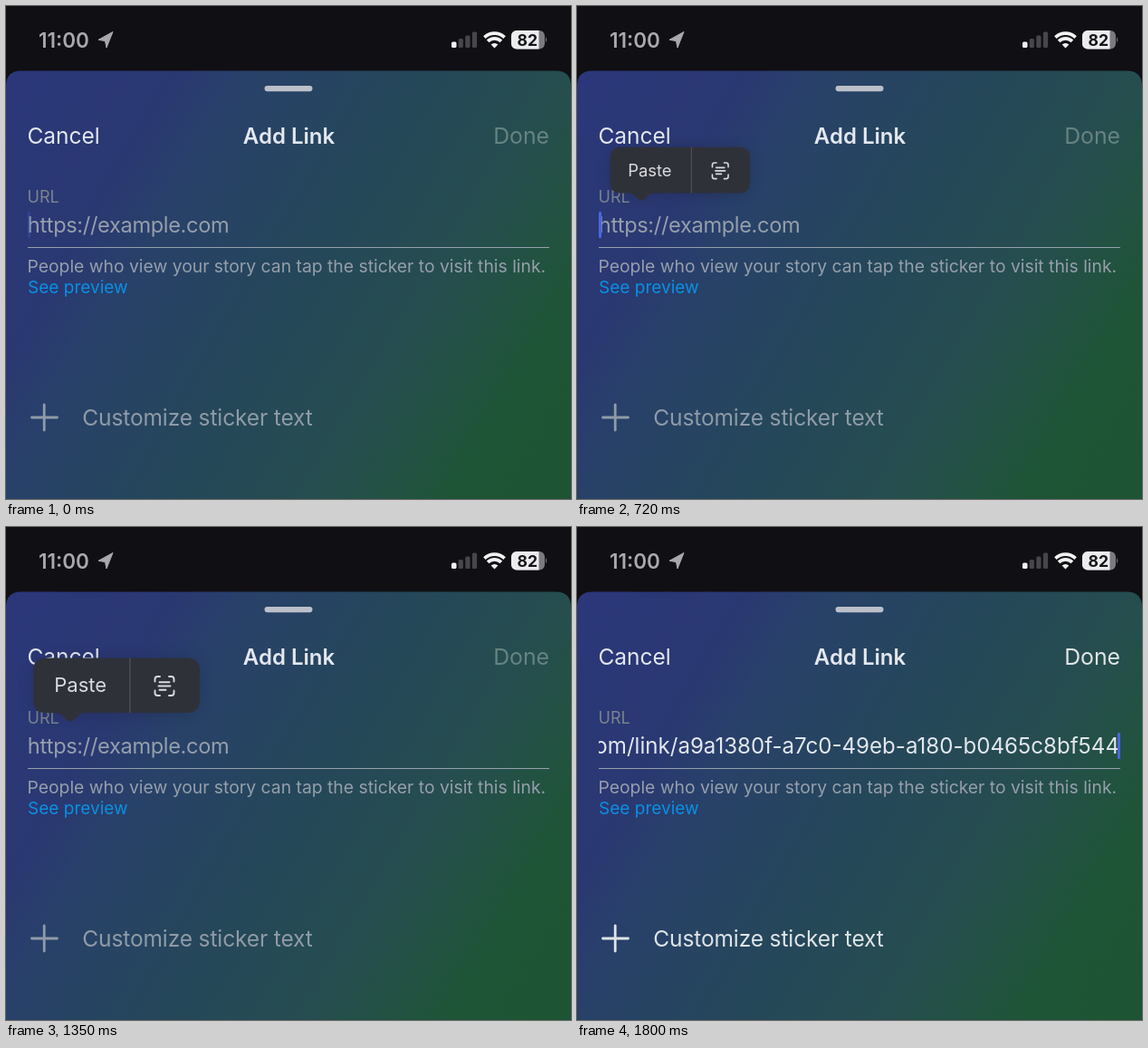
An HTML page that plays this animation: 624x544 px, repeating every 1830 ms.

```html
<!DOCTYPE html>
<html lang="en">
<head>
<meta charset="utf-8">
<title>Add Link</title>
<style>
  html, body { margin: 0; width: 100%; height: 100%; overflow: hidden; background: #100f13; }
  svg { display: block; width: 624px; height: 544px; }
  text {
    font-family: Inter, "Liberation Sans", sans-serif;
    font-optical-sizing: none;
    white-space: pre;
  }
  .bright { fill: #e3e7ef; }
  .soft { fill: #969fab; }
  .faint { fill: #7a848f; }
  .status { fill: #a9a8ad; }
  .line { fill: none; stroke-linecap: round; stroke-linejoin: round; }
  .bold { font-weight: 600; }
</style>
</head>
<body>
<svg viewBox="0 0 624 544">
  <defs>
    <linearGradient id="tint" gradientUnits="userSpaceOnUse" x1="31" y1="18" x2="699" y2="407">
      <stop offset="0" stop-color="#2b377a"/>
      <stop offset=".21" stop-color="#2a3872"/>
      <stop offset=".305" stop-color="#284169"/>
      <stop offset=".5" stop-color="#25475a"/>
      <stop offset=".68" stop-color="#264d50"/>
      <stop offset=".79" stop-color="#225241"/>
      <stop offset=".86" stop-color="#1e5536"/>
      <stop offset="1" stop-color="#1d5433"/>
    </linearGradient>
    <clipPath id="field"><rect x="24" y="222" width="576" height="40"/></clipPath>
    <clipPath id="cell"><rect x="558" y="27" width="37" height="20.5" rx="6"/></clipPath>
    <filter id="blur" x="-30%" y="-60%" width="160%" height="220%"><feGaussianBlur stdDeviation="10"/></filter>
  </defs>

  <rect width="624" height="544" fill="#100f13"/>

  <!-- status bar -->
  <text class="status bold" x="36" y="46" font-size="22.5">11:00</text>
  <path class="status" d="M118 28.5L102 37.3L109.5 38.6L111 46Z" stroke="#a9a8ad" stroke-linejoin="round"/>
  <g fill="#47464b">
    <rect x="492" y="39.5" width="5.5" height="6.5" rx="1.5" fill="#f2f2f4"/>
    <rect x="499.7" y="36" width="5.2" height="10" rx="1.5"/>
    <rect x="507.3" y="32.5" width="5.2" height="13.5" rx="1.5"/>
    <rect x="514.9" y="28.5" width="5.2" height="17.5" rx="1.5"/>
  </g>
  <g fill="none" stroke="#f2f2f4" stroke-width="3.7">
    <path d="M528.4 34.6a16 16 0 0 1 22.2 0"/>
    <path d="M532.1 38.9a10.5 10.5 0 0 1 14.8 0"/>
    <path d="M539.5 46.5l-3.9-4a5.6 5.6 0 0 1 7.8 0z" fill="#f2f2f4" stroke="none"/>
  </g>
  <g clip-path="url(#cell)">
    <rect x="558" y="27" width="37" height="21" fill="#7b7a7f"/>
    <rect x="558" y="27" width="30.5" height="21" fill="#ececef"/>
  </g>
  <path d="M596 34q2.4 3.2 0 6.5z" fill="#7b7a7f"/>
  <text x="575.8" y="43.7" font-size="17.6" font-weight="700" text-anchor="middle" fill="#151418">82</text>

  <!-- sheet -->
  <path d="M0 544V88.5Q0 71.5 17 71.5H607Q624 71.5 624 88.5V544Z" fill="url(#tint)"/>
  <rect x="285.5" y="88" width="53" height="6.2" rx="3.1" fill="#bbbfc9"/>
  <text class="bright" x="23.4" y="152" font-size="24.5">Cancel</text>
  <text class="bright bold" x="312.5" y="152" font-size="24" text-anchor="middle">Add Link</text>
  <text id="done" x="600" y="152" font-size="24.8" text-anchor="end">Done</text>

  <text class="faint" x="23.6" y="216.5" font-size="18">URL</text>
  <text id="hint" class="soft" x="23.8" y="249.5" font-size="23.6" letter-spacing="-.35">https://example.com</text>
  <g clip-path="url(#field)">
    <text id="link" class="bright" x="599" y="249.7" font-size="24.1" text-anchor="end">example.com/link/a9a1380f-a7c0-49eb-a180-b0465c8bf544</text>
  </g>
  <rect id="caret" y="227" width="3" height="29" rx="1.2" fill="#4a66df"/>
  <rect x="24" y="266" width="576" height="1" fill="#95a0ab"/>
  <text class="soft" x="23.5" y="294" font-size="19.32">People who view your story can tap the sticker to visit this link.</text>
  <text x="24" y="316.5" font-size="19.05" fill="#0a90e2">See preview</text>

  <g id="custom">
    <path class="line" d="M28.5 454H56.5M42.2 440V468" stroke="currentColor" stroke-width="2.8"/>
    <text x="84.3" y="462.5" font-size="24.5" letter-spacing="-.12" fill="currentColor">Customize sticker text</text>
  </g>

  <!-- edit menu, hung from the tip of its arrow -->
  <g id="menu">
    <rect x="32" y="148" width="180" height="57" rx="14" opacity=".18" filter="url(#blur)"/>
    <path d="M44 144.5H200Q214 144.5 214 158.5V191Q214 205 200 205H87Q82 205 77 211Q71 218 65 211Q60 205 55 205H44Q30 205 30 191V158.5Q30 144.5 44 144.5Z" fill="#2f3139"/>
    <rect x="136.3" y="144.5" width="1.2" height="60.5" fill="#54565d"/>
    <text x="53.3" y="182.3" font-size="22" fill="#d9dbdf">Paste</text>
    <g class="line" stroke="#d9dbdf" stroke-width="1.9">
      <path d="M164.5 170.5V168Q164.5 165 167.5 165H170M180 165H182.5Q185.5 165 185.5 168V170.5M185.5 180.5V183Q185.5 186 182.5 186H180M170 186H167.5Q164.5 186 164.5 183V180.5"/>
      <path d="M169.5 171.3H180.5M168.5 175.5H181.5M169.5 179.7H176.5"/>
    </g>
  </g>
</svg>

<script>
const LOOP = 1830, STEP = 30;
const OPEN = 515, CLOSE = 1432, PASTE = 1590, STIFFNESS = .016;
const TIP = { x: 71, y: 215 };
// [ms, caret opacity]
const BLINK = [[0, .25], [40, 0], [230, 0], [360, 1], [1120, 1], [1250, 0], [1400, 0], [1530, 1], [LOOP, 1]];

const $ = id => document.getElementById(id);
const clamp = v => Math.min(1, Math.max(0, v));

// critically damped spring from 0 to 1
function spring(ms) {
  const x = Math.max(0, ms) * STIFFNESS;
  return 1 - (1 + x) * Math.exp(-x);
}

function sample(table, t) {
  const i = table.findIndex(([at]) => at > t);
  const [t0, v0] = table[i - 1], [t1, v1] = table[i];
  return v0 + (v1 - v0) * (t - t0) / (t1 - t0);
}

function draw(t) {
  const pasted = t >= PASTE;
  const scale = t < CLOSE ? spring(t - OPEN) : 1 - spring(t - CLOSE);
  const alpha = clamp((t - 565) / 130) * clamp(1 - (t - 1440) / 165);

  $('menu').setAttribute('transform',
    `translate(${TIP.x} ${TIP.y}) scale(${scale}) translate(${-TIP.x} ${-TIP.y})`);
  $('menu').setAttribute('opacity', alpha);

  $('hint').style.display = pasted ? 'none' : '';
  $('link').style.display = pasted ? '' : 'none';
  $('caret').setAttribute('x', pasted ? 597 : 24);
  $('caret').setAttribute('opacity', pasted ? 1 : sample(BLINK, t));
  $('done').setAttribute('fill', pasted ? '#e0e6e6' : '#678382');
  $('custom').setAttribute('color', pasted ? '#dfe4e9' : '#8f9ba7');
}

const start = performance.now();
function tick() {
  const t = (performance.now() - start) % LOOP;
  draw(Math.floor(t / STEP) * STEP);
  requestAnimationFrame(tick);
}
tick();
</script>
</body>
</html>
```
